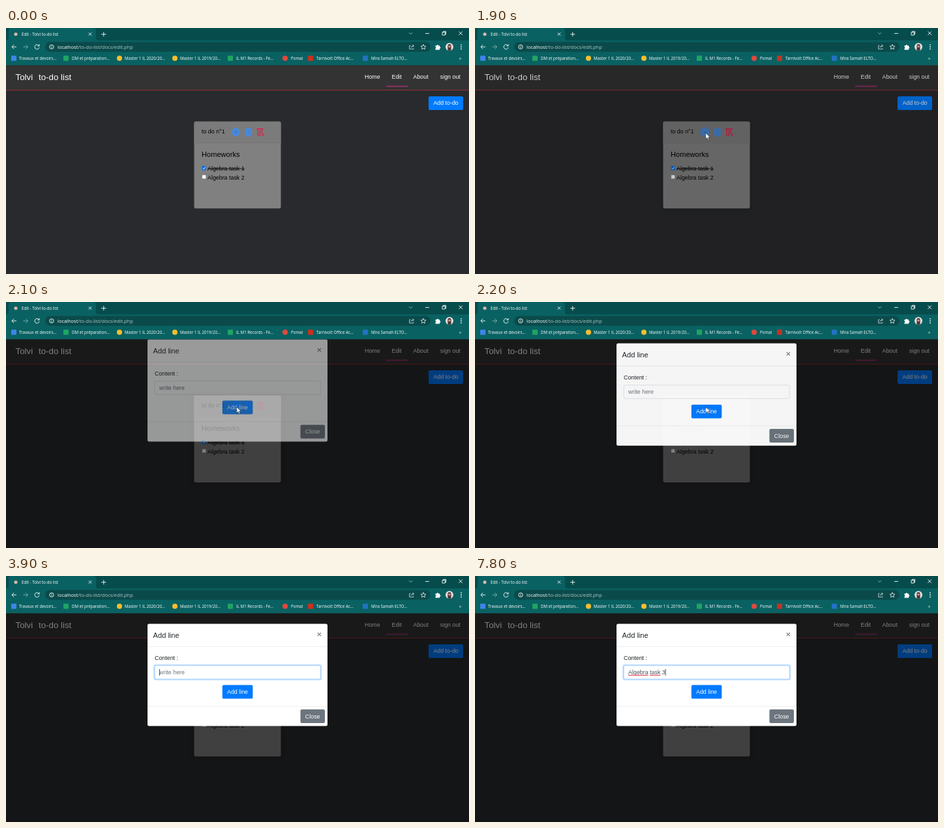
Animation of 710x378 px, one loop 8 s. Source, as an HTML page:

```html
<!DOCTYPE html>
<html lang="en">
<head>
<meta charset="utf-8">
<title>To-do editor</title>
<style>
  html, body { margin: 0; width: 100%; height: 100%; overflow: hidden; background: #292a2d; }
  svg { display: block; width: 710px; height: 378px; }
  text { font: 8.875px "Liberation Sans", Arial, sans-serif; white-space: pre; }
  .ui text { font: 6.2px "Open Sans", "Noto Sans", sans-serif; fill: #fff; }
  .ui text.url { font-size: 7.48px; }
  .line { fill: none; stroke: #fff; stroke-width: .9; }
  .big { font-size: 11.09px; }
  .brand { font-size: 13.3px; }
  .white { fill: #fff; }
  .mid { text-anchor: middle; }
</style>
</head>
<body>
<svg viewBox="0 0 710 378">
  <defs>
    <clipPath id="view"><rect y="57.4" width="710" height="321"/></clipPath>
    <filter id="soft" x="-30%" y="-30%" width="160%" height="160%"><feGaussianBlur stdDeviation="3"/></filter>
    <filter id="halo" x="-50%" y="-50%" width="200%" height="200%"><feGaussianBlur stdDeviation="1.6"/></filter>
    <clipPath id="face"><circle cx="680" cy="29" r="6"/></clipPath>
  </defs>

  <!-- browser frame -->
  <g class="ui">
    <rect width="710" height="58" fill="#064c4c"/>
    <path d="M0 19Q4 19 4 15V4Q4 0 8 0H134Q138 0 138 4V15Q138 19 142 19H710V58H0Z" fill="#0a6162"/>
    <circle cx="15" cy="9.5" r="2.6" fill="#d8b4b0"/>
    <text x="24" y="11.6">Edit - Tolvi to-do list</text>
    <path class="line" d="M126.8 7.2l4.4 4.4m0-4.4l-4.4 4.4M146.3 9.6h7M149.8 6.1v7"/>
    <path class="line" stroke-opacity=".6" d="M618 7l2.6 2.6L623.2 7"/>
    <path class="line" d="M643 8.4h6M669 6.6h4.3v4.3H669ZM670.4 6.4v-1.2h4.2v4.3h-1.2M694.5 5.4l5.4 5.4m0-5.4l-5.4 5.4"/>

    <path class="line" stroke-width="1.1" d="M16 29H9M12.2 25.7L8.9 29l3.3 3.3"/>
    <path class="line" stroke-opacity=".5" d="M26.5 29h7M30.2 25.7L33.5 29l-3.3 3.3"/>
    <path class="line" d="M50.2 26.7A3.5 3.5 0 1 0 51 29.8M51.1 25v2.6h-2.6"/>
    <rect x="60" y="21.5" width="591" height="15" rx="7.5" fill="#0b4a4b"/>
    <circle class="line" cx="70" cy="29" r="3.2" stroke-width=".7"/>
    <path class="line" d="M70 28.5v2.2M70 27v.8"/>
    <text class="url" x="79" y="31.7">localhost<tspan fill="#aecaca">/to-do-list/docs/edit.php</tspan></text>
    <path class="line" stroke-opacity=".75" stroke-width=".7" d="M620.5 27h-1.8v5.3h6.2v-1.4M620.8 30.2q.4-2.8 4.4-2.8M623.3 25.4l2.2 2-2.2 2"/>
    <path class="line" stroke-opacity=".85" stroke-width=".7" d="M640 25.2l1.1 2.6 2.8.2-2.1 1.9.6 2.8-2.4-1.5-2.4 1.5.6-2.8-2.1-1.9 2.8-.2Z"/>
    <path class="white" d="M658.5 27h2a1.3 1.3 0 1 1 2.6 0h2v2a1.3 1.3 0 1 1 0 2.6v1.9h-6.6v-2a1.3 1.3 0 0 0 0-2.5Z"/>
    <g clip-path="url(#face)">
      <rect x="674" y="23" width="12" height="12" fill="#e4dfe0"/>
      <path d="M677.4 35v-7a2.6 3.2 0 0 1 5.2 0v7Z" fill="#4b3536"/>
      <circle cx="680" cy="28.4" r="1.7" fill="#c99a8b"/>
    </g>
    <g class="white"><circle cx="698" cy="25.8" r=".9"/><circle cx="698" cy="29" r=".9"/><circle cx="698" cy="32.2" r=".9"/></g>

    <g id="marks"></g>
    <text x="695" y="48.6">»</text>
  </g>

  <g clip-path="url(#view)">
    <!-- page -->
    <rect y="57" width="710" height="321" fill="#292a2d"/>
    <rect y="57" width="710" height="38.4" fill="#333"/>
    <rect y="95" width="710" height="1" fill="#963039"/>
    <g class="white">
      <text class="brand" x="14.5" y="80.3" font-weight="700" font-style="italic">Tolvi</text>
      <text class="brand" x="50" y="80.3">to-do list</text>
      <text x="550" y="78.2">Home</text><text x="591.5" y="78.2">Edit</text>
      <text x="624.5" y="78.2">About</text><text x="665.8" y="78.2">sign out</text>
    </g>
    <rect x="583" y="88.6" width="33" height="1.9" fill="#92306a"/>
    <rect x="648" y="105" width="53" height="21" rx="2.2" fill="#007bff"/>
    <text class="white mid" x="674.6" y="118.4">Add to-do</text>

    <rect id="shade" x="286" y="143" width="138" height="137" rx="3" fill="#000" filter="url(#soft)"/>
    <rect x="288.5" y="143.8" width="133" height="133.4" rx="2.2" fill="#808080"/>
    <path d="M288.5 177v-31q0-2.2 2.2-2.2h128.6q2.2 0 2.2 2.2v31Z" fill="#7b7b7b"/>
    <rect x="288.5" y="176.4" width="133" height=".6" fill="#747474"/>
    <text x="300" y="162.1">to do n°1</text>

    <circle id="ring" cx="352.5" cy="160" r="7.4" fill="#3a80dc" filter="url(#halo)"/>
    <circle cx="352.5" cy="160" r="6.2" fill="#4a88d6"/>
    <circle cx="352.5" cy="160" r="6.2" fill="none" stroke="#4a88d6" stroke-width="1.4" stroke-dasharray="3.2 1.67"/>
    <path d="M350 160h5M352.5 158.6v2.8" stroke="#386fb8" stroke-width=".9"/>
    <rect x="366.6" y="153.8" width="10.2" height="12.6" rx="3" fill="#4a88d6"/>
    <path d="M370.2 161.2l3-3" stroke="#386fb8" stroke-width=".9"/>
    <g fill="none" stroke="#d9264f">
      <path d="M384.3 155.2h10.4" stroke-width="1.7"/>
      <path d="M386.2 156v8.6M389.3 157v7.5M392.2 156v6" stroke-width="1.6"/>
      <path d="M385.4 165.2h5.2M392.3 162.2l3.4 3.4m0-3.4l-3.4 3.4" stroke-width="1.2"/>
    </g>

    <text class="big" x="300" y="197.6">Homeworks</text>
    <rect x="300.4" y="212" width="6.6" height="6.6" rx="1" fill="#0f6fe0"/>
    <path d="M301.8 215.4l1.5 1.5 2.5-3.2" fill="none" stroke="#fff" stroke-width="1"/>
    <text x="309" y="219.2">Algebra task 1</text>
    <rect x="309" y="215.8" width="57" height=".8"/>
    <rect x="300.7" y="225.8" width="6" height="6" rx="1" fill="#fff" stroke="#6b6b6b" stroke-width=".5"/>
    <text x="309" y="232.5">Algebra task 2</text>

    <rect id="veil" y="57" width="710" height="321"/>

    <!-- dialog -->
    <g id="modal">
      <rect x="217" y="73.4" width="276" height="157.2" rx="2.5" fill="#fff"/>
      <text class="big" x="225.6" y="94.9" fill="#212529">Add line</text>
      <text class="brand" x="476.4" y="93.8" font-weight="700" fill="#666">×</text>
      <rect x="217" y="108.2" width="276" height=".6" fill="#dee2e6"/>
      <text x="228" y="129.4" fill="#212529">Content :</text>
      <rect id="glow" x="227.1" y="136.6" width="256.2" height="22.8" rx="3" fill="none" stroke="#bfdeff" stroke-width="1.8"/>
      <rect id="field" x="228.2" y="137.7" width="254" height="20.6" rx="2.2" fill="#fff" stroke-width=".6"/>
      <text id="value" x="235.1" y="151.3"></text>
      <rect id="wavyA" y="152" height="1" fill="#e0384a"/>
      <rect id="wavyB" y="152" height="1" fill="#e0384a"/>
      <rect id="caret" y="143" width=".8" height="10" fill="#222"/>
      <rect x="331.8" y="167.6" width="46.6" height="21" rx="2.2" fill="#007bff"/>
      <text class="white mid" x="355" y="181.2">Add line</text>
      <rect x="217" y="199.8" width="276" height=".6" fill="#dee2e6"/>
      <rect x="451.5" y="205" width="37.5" height="21" rx="2.2" fill="#6c757d"/>
      <text class="white mid" x="470.2" y="218.6">Close</text>
    </g>
  </g>
  <path id="mouse" d="M0 0V9.2L2.1 7.3 3.6 10.6 5.1 9.9 3.7 6.7H6.6Z" fill="#fff" stroke="#111" stroke-width=".5"/>
</svg>
<script>
const LOOP = 8000;
const el = id => document.getElementById(id);
const set = (id, props) => { for (const k in props) el(id).setAttribute(k, props[k]); };
const clamp = v => Math.min(1, Math.max(0, v));
const span = (t, start, length) => clamp((t - start) / length);

// bookmark: icon x, text x, label, colour, round icon
const marks = [
  [12, 20, 'Travaux et devoirs...', '#3f84e8'],
  [92, 101, 'DM et préparation...', '#1fa463'],
  [174, 182, 'Master 1 IL 2020/20...', '#f4bd2f', true],
  [259, 267, 'Master 1 IL 2019/20...', '#f4bd2f', true],
  [344, 353, 'IL M1 Records - Fe...', '#1fa463'],
  [428, 437, 'Pomal', '#e2483d', true],
  [467, 476, 'Tarnivolt Office Ac...', '#c8321f'],
  [551, 560, 'Mira Samah ELTO...', '#2272c3']
];
el('marks').innerHTML = marks.map(([ix, tx, label, color, round]) =>
  `<rect x="${ix - 4}" y="42.5" width="8" height="8" rx="${round ? 4 : .8}" fill="${color}"/>` +
  `<text x="${tx}" y="48.8">${label}</text>`).join('');

const phrase = 'Algebra task 3';
const keys = [4200, 4500, 5100, 5700, 5800, 6000, 6200, 6300, 6700, 6800, 7000, 7200, 7400, 7800];
const focusAt = 2900;

function drawMouse(t) {
  const p = span(t, 100, 800);
  const e = p * p * (3 - 2 * p);
  let x = 646 + (352 - 646) * e;
  let y = 6 + (162.4 - 6) * e;
  if (t >= 1000) { x = 353.8; y = 161.2; }
  set('mouse', { transform: `translate(${x} ${y})`, opacity: t >= 100 && t < 2600 ? 1 : 0 });
  set('shade', { opacity: .12 * span(t, 600, 300) });
  set('ring', { opacity: t >= 1700 ? .5 : 0 });
}

function drawModal(t) {
  const p = span(t, 1960, 540);
  const lift = -27 * Math.pow(1 - p, 1.7);
  set('veil', { opacity: .5 * span(t, 1800, 240) });
  set('modal', { opacity: span(t, 1960, 250), transform: `translate(0 ${lift})` });
}

function drawInput(t) {
  const count = keys.filter(k => k <= t).length;
  const text = el('value');
  const width = n => n ? text.getSubStringLength(0, n) : 0;
  const focus = span(t, focusAt - 100, 200);
  set('glow', { opacity: focus });
  set('field', { stroke: focus ? '#80bdff' : '#ced4da' });

  text.textContent = count ? phrase.slice(0, count) : 'write here';
  set('value', { fill: count ? '#495057' : '#6c757d' });

  const last = count ? keys[count - 1] : focusAt;
  const on = t >= focusAt && Math.floor((t - last) / 500) % 2 === 0;
  set('caret', { x: 235.1 + width(count), opacity: on ? 1 : 0 });

  const mark = (id, from, to, at) => {
    const show = t >= at;
    const a = show ? width(from) : 0;
    set(id, { x: 235.1 + a, width: show ? width(to) - a : 0 });
  };
  mark('wavyA', 0, 7, 6400);
  mark('wavyB', 8, 12, 7400);
}

const began = performance.now();
function frame() {
  const t = Math.floor(((performance.now() - began) % LOOP) / 100) * 100;
  drawMouse(t);
  drawModal(t);
  drawInput(t);
  requestAnimationFrame(frame);
}
frame();
</script>
</body>
</html>
```
